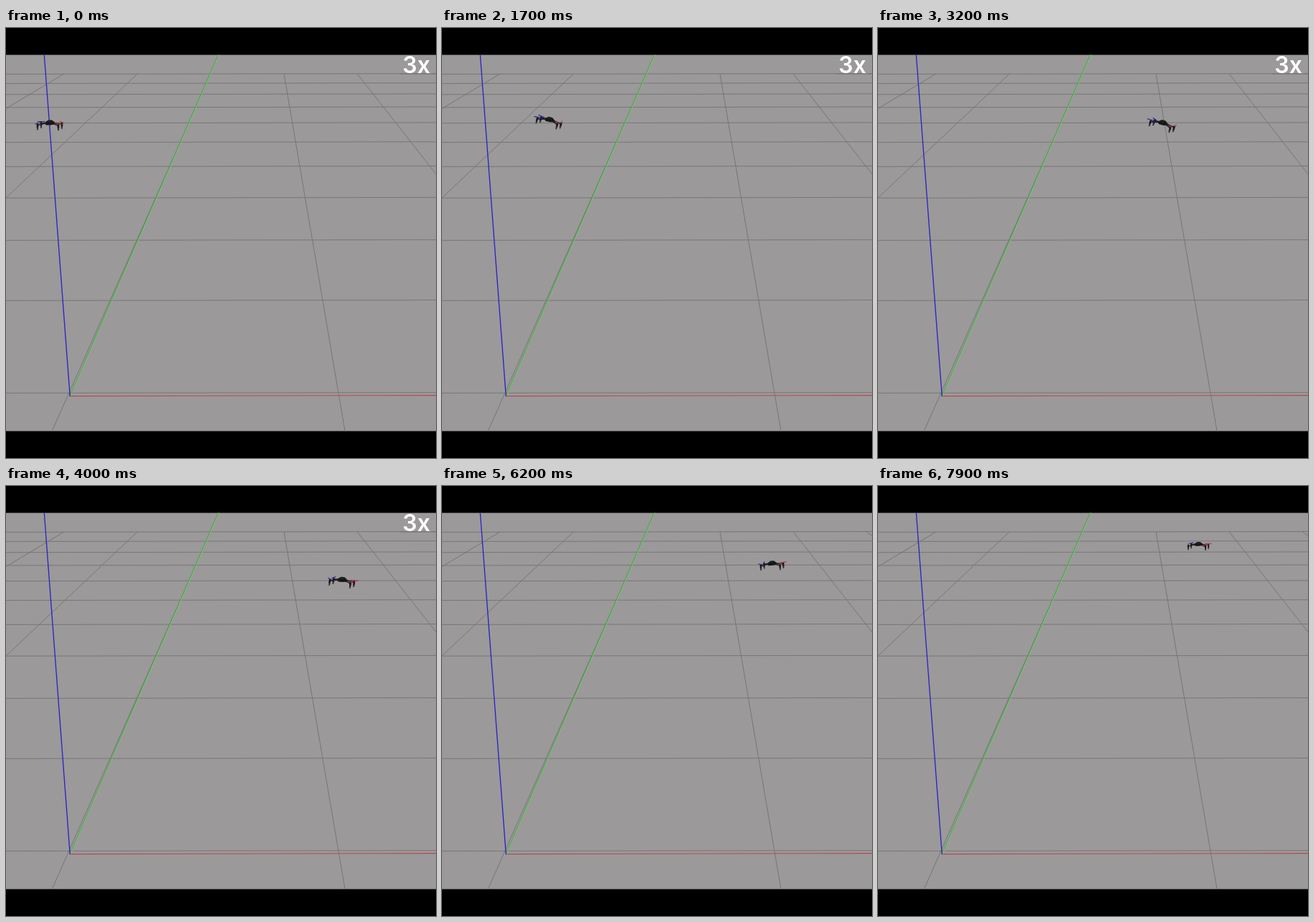
These frames come from a looping animation (600 by 600 pixels, 8 s). An HTML page:

```html
<!DOCTYPE html>
<html lang="en">
<head>
<meta charset="utf-8">
<title>Drone flight</title>
<style>
  html, body { margin: 0; width: 100%; height: 100%; overflow: hidden; background: #000; }
  svg { display: block; width: 100vw; height: 100vh; }
  text { font: 600 32px Inter, "Liberation Sans", sans-serif; fill: #fff; }
</style>
</head>
<body>
<svg viewBox="0 0 600 600">
  <clipPath id="view"><rect y="37.5" width="600" height="525"/></clipPath>
  <g clip-path="url(#view)">
    <rect width="600" height="600" fill="#9b999a"/>
    <g id="grid" stroke="#777576"></g>
    <g fill="none">
      <path d="M89 513.6L600 512.6" stroke="#b9484c" stroke-width="1.1"/>
      <path d="M90 513L297.3 37" stroke="#7cc47a" stroke-width="1.3"/>
      <path d="M89.3 513L296.3 37" stroke="#42a042" stroke-width="0.9"/>
      <path d="M53.3 37L89.3 514" stroke="#2a20c4" stroke-width="1.3"/>
    </g>
    <g id="drone" stroke-linecap="round"></g>
    <g id="label">
      <path d="M590 63L600 68" stroke="#9b999a" stroke-width="3"/>
      <path d="M550 64H600" stroke="#777576"/>
      <text x="553.3" y="63.3">3x</text>
    </g>
  </g>
</svg>
<script>
const LOOP = 8000, STEP = 100, LABEL_END = 5000;
const byId = id => document.getElementById(id);
const drone = byId("drone"), label = byId("label");

const line = (x1, y1, x2, y2, color = "", width = 1) =>
  `<path d="M${x1} ${y1}L${x2} ${y2}" ${color && `stroke="${color}"`} stroke-width="${width}"/>`;

// Ground grid in perspective: rows shrink toward the horizon, columns meet there.
function gridLines() {
  const vanish = { x: 359.5, y: -102.4 }, far = 64, bottom = 563;
  const spread = (bottom - vanish.y) / (far - vanish.y);
  let lines = "";
  for (let row = 0; row <= 10; row++) {
    const y = vanish.y + 2286 / (row + 3.739);
    lines += line(0, y + 0.4, 600, y - 0.4);
  }
  for (let col = 0; col <= 5; col++) {
    const x = 81 + 102.3 * col;
    lines += line(x, far, vanish.x + (x - vanish.x) * spread, bottom);
  }
  return lines;
}
byId("grid").innerHTML = gridLines();

const part = (t, from, to) => Math.min(1, Math.max(0, (t - from) / (to - from)));
const ease = (t, from, to) => {
  const u = part(t, from, to);
  return u * u * (3 - 2 * u);
};
const hill = (t, from, to) => Math.sin(Math.PI * part(t, from, to));

// Fly right, hover, then recede toward the horizon.
function poseAt(t) {
  const cross = ease(t, 650, 4150), recede = ease(t, 5100, 7500);
  return {
    x: 61 + 410 * cross - 24 * recede - 5 * hill(t, 0, 900) + 4 * hill(t, 4000, 5200),
    y: 134.5 - 4.5 * hill(t, 600, 2800) - 3.5 * ease(t, 3000, 5200) - 48 * recede,
    tilt: 19 * hill(t, 700, 4400) - 3 * hill(t, 5200, 7500),
    size: 1 - 0.17 * recede
  };
}

function rotor(x, y, phase) {
  const color = x < 0 ? "#26268c" : "#a8343a";
  const dx = 5 * Math.cos(phase), dy = 1.2 * Math.sin(phase);
  return line(0, -3, x, y, "#202022", 1.7) +
    line(x, y - 1, x, y + 3, "#18181b", 2.6) +
    line(x, y + 3, x, y + 6, "#2c2c2f", 1.8) +
    line(x - dx, y - 2.5 - dy, x + dx, y - 2.5 + dy, color, 1.2);
}

function draw(now) {
  const t = Math.floor(now % LOOP / STEP) * STEP;
  const { x, y, tilt, size } = poseAt(t);
  const spin = t * 0.017;
  drone.setAttribute("transform", `translate(${x} ${y}) rotate(${tilt}) scale(${size})`);
  drone.innerHTML =
    rotor(-12, -1.5, spin) + rotor(17, -0.5, spin + 1) +
    rotor(-17, 1, spin + 2.2) + rotor(12, 1.8, spin + 0.4) +
    `<path d="M-7 -1L-5 -4L-2 -6H3L7 -3L6 0L1 1L-5 1Z" fill="#161719"/>` +
    line(-3, -4, 2, -4.5, "#26302a");
  label.style.display = t < LABEL_END ? "" : "none";
}

const start = performance.now();
function tick() {
  draw(performance.now() - start);
  requestAnimationFrame(tick);
}
tick();
</script>
</body>
</html>
```
